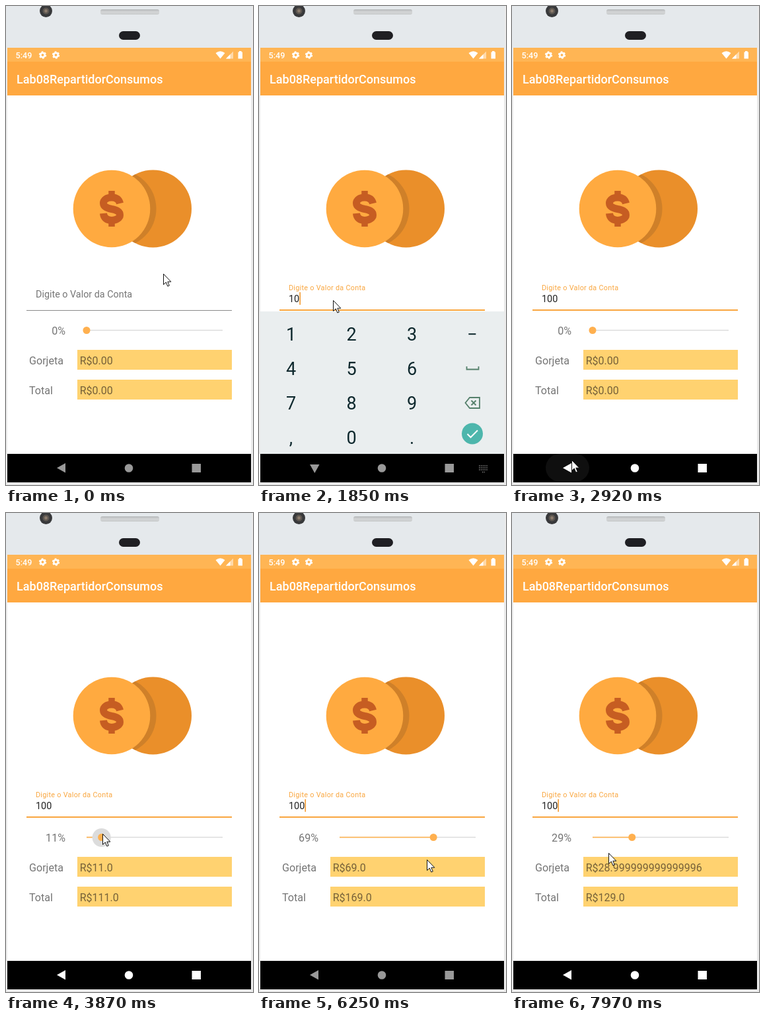
An HTML page for the animation above (8000 ms loop, 374x723 px).

```html
<!DOCTYPE html>
<html lang="pt">
<head>
<meta charset="utf-8">
<title>Calculadora</title>
<style>
  html, body { margin: 0; width: 100%; height: 100%; overflow: hidden; background: #ebebeb; }
  svg { display: block; width: 374px; height: 723px; font-family: Roboto, sans-serif; }
  .form { font-size: 16.1px; fill: #757575; }
  .value { font-size: 16px; fill: #756139; }
  .keys { font-size: 27px; fill: #0e282d; text-anchor: middle; }
  .line { fill: none; stroke: #55806b; stroke-width: 1.8; }
</style>
</head>
<body>
<svg viewBox="0 0 374 723">
  <defs>
    <clipPath id="coin"><circle cx="222.5" cy="306" r="58.5"/></clipPath>
    <clipPath id="screen"><path d="M2 63H371V719H2Z"/></clipPath>
    <linearGradient id="slot" x2="0" y2="1">
      <stop stop-color="#b5b8ba"/><stop offset=".5" stop-color="#d3d5d6"/><stop offset="1" stop-color="#c9cccd"/>
    </linearGradient>
    <g id="gear" fill="none" stroke="#fff">
      <circle r="3.2" stroke-width="2.6"/>
      <circle r="4.7" stroke-width="2" stroke-dasharray="2.7 2.22"/>
    </g>
  </defs>

  <!-- phone body -->
  <path d="M0 0H374V723H0Z" fill="#ebebeb"/>
  <path d="M0 0H372V63H0Z" fill="#e5e9ec"/>
  <circle cx="60.5" cy="7.5" r="9.5" fill="#38393b"/>
  <circle cx="60.5" cy="7.5" r="5" fill="#5d5751"/>
  <circle cx="60.5" cy="7.5" r="2.4" fill="#8b7b6c"/>
  <rect x="143" y="5" width="89" height="8" rx="3" fill="url(#slot)"/>
  <rect x="171" y="38" width="32" height="13" rx="6.5" fill="#1f1f23"/>

  <!-- bars -->
  <path d="M2 63H371V719H2Z" fill="#fff"/>
  <path d="M2 63H371V84H2Z" fill="#ffb554"/>
  <path d="M2 84H371V135H2Z" fill="#ffa840"/>
  <g fill="#fff" font-weight="500">
    <text x="14.5" y="79" font-size="12.6">5:49</text>
    <text x="16" y="117" font-size="18">Lab08RepartidorConsumos</text>
    <path d="M317.5 71Q324.5 65.5 331.5 71L324.5 79.5Z"/>
    <path d="M344 68.5V79.5H333Z" opacity=".5"/>
    <path d="M339.5 73V79.5H333Z"/>
    <path d="M351.5 69.5H353V68H356.500V69.500H358V79.500H351.500Z"/>
  </g>
  <use href="#gear" x="55.500" y="74"/>
  <use href="#gear" x="75.500" y="74"/>

  <!-- coins -->
  <circle cx="222.5" cy="306" r="58.5" fill="#ea8f2a"/>
  <circle cx="169" cy="306" r="58.5" fill="#cf8029" clip-path="url(#coin)"/>
  <circle cx="160" cy="306" r="58.3" fill="#ffaa40"/>
  <g fill="none" stroke="#c65d22">
    <path stroke-width="11" d="M172.500 298C171 291 166 289 160 289C152 289 147.500 293 147.500 297.500C147.500 303 153 305 160 306.500C168 308 172.500 310 172.500 315.500C172.500 320 167 323.500 160 323.500C153 323.500 148 320 147.500 313"/>
    <path stroke-width="9.500" d="M160 279V290M160 322V333"/>
  </g>

  <!-- form -->
  <text id="label" x="45">Digite o Valor da Conta</text>
  <text id="typed" x="45" y="447" font-size="14.4" fill="#212121"></text>
  <rect id="caret" y="432" width="1.7" height="19" fill="#f59f3a"/>
  <rect id="rule" x="31" width="311"/>
  <path d="M122 489.5H328" stroke="#dcdcdc" stroke-width="1.6"/>
  <path id="fill" stroke="#ffb04a" stroke-width="1.6"/>
  <circle id="halo" cy="490" fill="#dcdcdc"/>
  <circle id="thumb" cy="489.5" r="5.5" fill="#ffb04f"/>
  <path d="M108 519H342V549H108ZM108 564H342V594H108Z" fill="#ffd270"/>
  <g class="form">
    <text id="percent" x="90" y="496" text-anchor="end"></text>
    <text x="35" y="541">Gorjeta</text>
    <text x="35" y="586">Total</text>
    <text id="tip" class="value" x="111.7" y="541"></text>
    <text id="total" class="value" x="111.7" y="586"></text>
  </g>

  <!-- navigation bar -->
  <path d="M2 676H371V719H2Z" fill="#000"/>
  <rect id="press" x="51" y="676" width="66" height="42" rx="21" fill="#222"/>
  <g clip-path="url(#screen)">
    <g id="board">
      <path d="M2 461H371V676H2Z" fill="#eaeeef"/>
      <g id="keys" class="keys"></g>
      <path class="line" d="M314.500 544V548.500H332.500V544"/>
      <path class="line" d="M319 591H334V607H319L312.500 599ZM321.500 595.500L328.500 602.500M328.500 595.500L321.500 602.500"/>
      <circle cx="323" cy="645.5" r="16" fill="#4db6ac"/>
      <path d="M315.500 646L320.500 651L331 640.500" fill="none" stroke="#fff" stroke-width="2"/>
    </g>
  </g>
  <g id="nav">
    <path id="back"/>
    <circle cx="186" cy="697.5" r="6.3"/>
    <path d="M281.500 691H295V704H281.500Z"/>
    <path id="switcher" fill="none" stroke="#777" stroke-width="1.4" stroke-dasharray="1.6 1.2" d="M333 694H347M333 697H347M333 700H347M338 703.500H342"/>
  </g>

  <path id="cursor" d="M.5 .5V16.500L4.300 13L6.800 19L9.300 18L6.800 12.200H11.800Z" fill="#fff" stroke="#111" stroke-width="1"/>
</svg>

<script>
const $ = id => document.getElementById(id);
const set = (id, attrs) => { for (const k in attrs) $(id).setAttribute(k, attrs[k]); };
const clamp = v => Math.max(0, Math.min(1, v));

// runs of screen updates: start, end, number of updates
const runs = [
  [0, 0, 1], [70, 360, 5], [520, 750, 4], [990, 990, 1], [1450, 1450, 1], [1850, 1850, 1],
  [2000, 2000, 1], [2170, 2920, 11], [3000, 3390, 6], [3560, 3870, 5], [4020, 4780, 11],
  [4860, 5080, 4], [5330, 5480, 3], [5660, 5660, 1], [5800, 6570, 11], [6640, 7270, 9], [7410, 7970, 8]
];

// time, x, y
const pointer = [
  [0, 238, 404], [290, 114, 452], [360, 112, 444], [2100, 112, 444], [2540, 82, 705],
  [2770, 82, 705], [2920, 90, 685], [3390, 146, 486], [3870, 146, 484], [4704, 214, 486],
  [4780, 229, 488], [5006, 270, 495], [5080, 265, 493], [5730, 265, 493], [6262, 254, 523],
  [6570, 238, 489], [7270, 183, 490], [7640, 183, 490], [7970, 146, 513]
];

// time, opacity, drop
const board = [
  [520, 0, 40], [597, .6, 20], [673, .93, 3], [750, 1, 0],
  [2700, 1, 0], [2770, .75, 8], [2845, .25, 22], [2920, 0, 40]
];

function updateTime(t) {
  const [a, b, n] = runs.filter(r => r[0] <= t).pop();
  if (n < 2) return a;
  const step = (b - a) / (n - 1);
  return a + step * Math.min(n - 1, Math.floor((t - a) / step + .2));
}

function along(track, t) {
  const i = track.findIndex(k => k[0] > t);
  if (i < 0) return track[track.length - 1].slice(1);
  if (i === 0) return track[0].slice(1);
  const p = track[i - 1], q = track[i], u = (t - p[0]) / (q[0] - p[0]);
  return p.slice(1).map((v, j) => v + (q[j + 1] - v) * u);
}

function percentAt(t) {
  if (t < 3560) return 0;
  if (t < 5330) return Math.floor(11 + 33 * clamp((t - 3944) / 760) ** 1.5);
  return t < 7410 ? 69 : 29;
}

const money = v => "R$" + (Number.isInteger(v) ? v + ".0" : v);

["123−", "456", "789", ",0."].forEach((row, r) => [...row].forEach((c, i) => {
  const key = document.createElementNS("http://www.w3.org/2000/svg", "text");
  key.setAttribute("x", 48.5 + 91.5 * i);
  key.setAttribute("y", 504.5 + 52 * r);
  key.textContent = c;
  $("keys").append(key);
}));

function drawField(t) {
  const up = clamp((t - 440) / 230), focus = t >= 520;
  const count = (t >= 1450) + (t >= 1850) + (t >= 2000);
  const blink = t < 990 ? t >= 590 : t >= 1450 && (t < 2400 || (t + 40) % 1000 < 500);
  set("label", {
    y: 440 - 10.6 * up, "font-size": 14.35 - 3.55 * up,
    "letter-spacing": .28 * up, fill: focus ? "#f9a63f" : "#757575"
  });
  set("rule", { y: focus ? 458 : 459, height: focus ? 2 : 1, fill: focus ? "#f9a63f" : "#8a8a8a" });
  set("caret", { x: 45.1 + 8.08 * count, opacity: +blink });
  $("typed").textContent = "100".slice(0, count);
}

function drawSlider(t) {
  const p = percentAt(t), x = 122 + 2.06 * p, tip = 100 * (p / 100);
  const held = [[3560, 4740], [5330, 5660], [7410, 7680]].find(h => t >= h[0] && t < h[1]);
  set("thumb", { cx: x });
  set("fill", { d: `M122 489.500H${x}` });
  set("halo", { cx: x, r: held ? 14 * clamp((t - held[0] + 60) / 200) : 0 });
  $("percent").textContent = p + "%";
  $("tip").textContent = t < 3560 ? "R$0.00" : money(tip);
  $("total").textContent = t < 3560 ? "R$0.00" : money(100 + tip);
  return x;
}

function drawSystem(t) {
  const [alpha, drop] = along(board, t), typing = t >= 590 && t < 2600;
  const bright = t >= 2840 && !(t >= 5900 && t < 6560);
  set("board", { opacity: alpha, transform: `translate(0 ${drop})` });
  set("press", { opacity: t < 2600 ? 0 : clamp((3060 - t) / 300) });
  set("nav", { fill: bright ? "#fff" : "#999" });
  set("back", { d: typing ? "M77 692H91.500L84.300 705Z" : "M90 690V704.500L77 697.200Z" });
  set("switcher", { opacity: +typing });
}

function draw() {
  const t = updateTime(performance.now() % 8000);
  drawField(t);
  drawSystem(t);
  const thumb = drawSlider(t);
  let [x, y] = along(pointer, t);
  if (t >= 4020 && t < 4740) x = thumb + 2;
  set("cursor", { transform: `translate(${x} ${y})` });
  requestAnimationFrame(draw);
}
draw();
</script>
</body>
</html>
```
